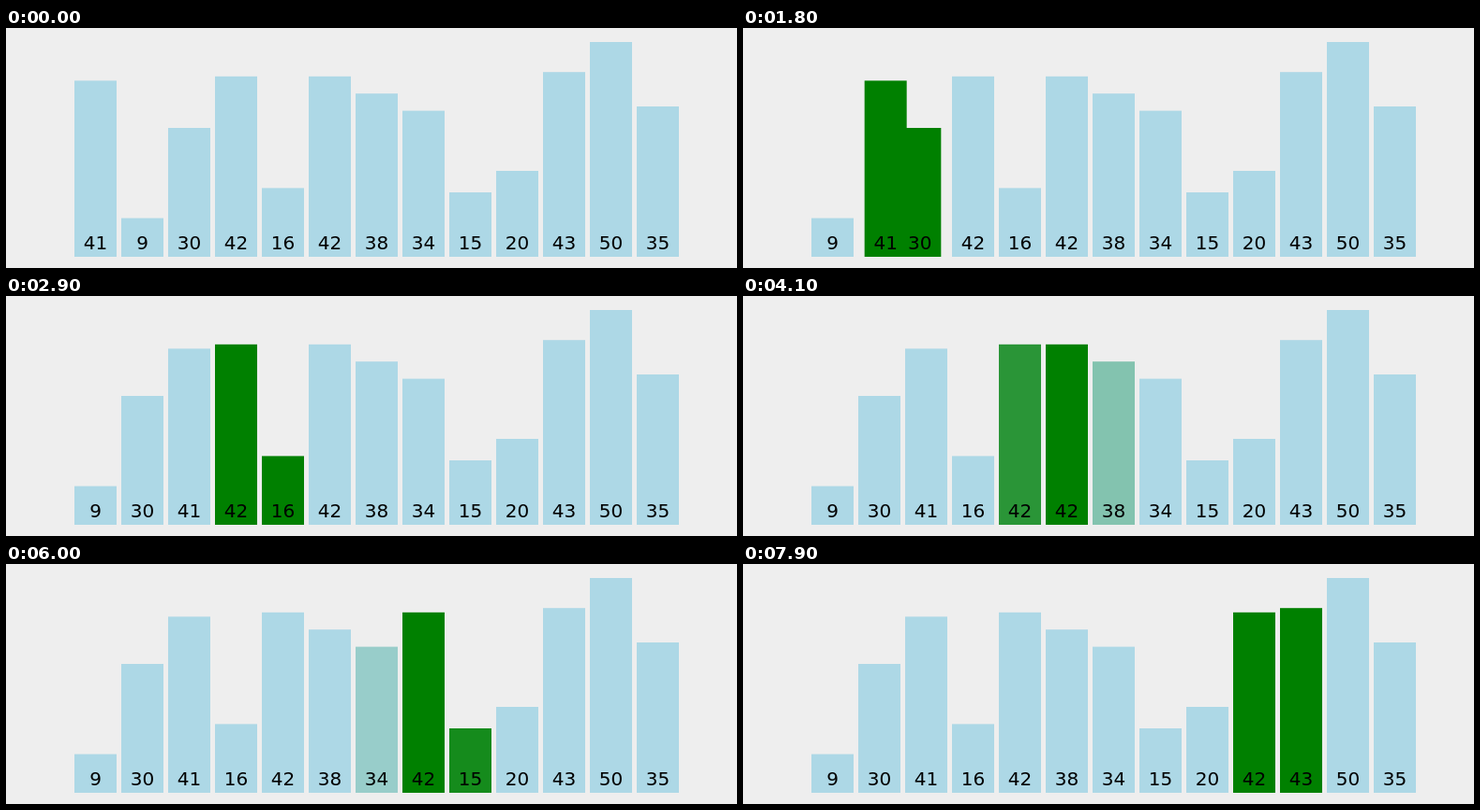
These frames come from a looping animation (780 by 257 pixels, 8000 ms). An HTML page with a canvas:

```html
<!DOCTYPE html>
<html lang="en">
<head>
<meta charset="utf-8">
<title>Bubble sort</title>
<style>
  html, body { margin: 0; width: 100%; height: 100%; overflow: hidden; background: #eee; }
  canvas { display: block; }
</style>
</head>
<body>
<canvas id="stage" width="780" height="257"></canvas>
<script>
const ctx = document.getElementById('stage').getContext('2d');
const values = [41, 9, 30, 42, 16, 42, 38, 34, 15, 20, 43, 50, 35];
const LOOP = 8000, TICK = 100;
const FIRST = 350, GAP = 456.5, LENGTH = 250;
const LEFT = 73, PITCH = 50, WIDTH = 45, BASE = 245, UNIT = 4.6;
const IDLE = [173, 216, 230], ACTIVE = [0, 128, 0];

const clamp = u => Math.max(0, Math.min(1, u));
const ease = u => u < 0.5 ? 4 * u ** 3 : 1 - 4 * (1 - u) ** 3;
const mix = (a, b, p) => a + (b - a) * p;

// One bubble pass as evenly spaced stages: mark a pair, then swap it if needed.
function planPass() {
  const order = values.map((_, i) => i);
  const stages = [];
  for (let j = 0; j < order.length - 1; j++) {
    const [a, b] = [order[j], order[j + 1]];
    stages.push({ type: 'mark', a, b });
    if (values[a] > values[b]) {
      stages.push({ type: 'swap', a, b, slot: j });
      order[j] = b;
      order[j + 1] = a;
    }
  }
  return stages;
}
const stages = planPass();

function barsAt(time) {
  const bars = values.map((value, i) => ({ value, slot: i, glow: 0 }));
  stages.forEach(({ type, a, b, slot }, k) => {
    const p = ease(clamp((time - FIRST - k * GAP) / LENGTH));
    if (p === 0) return;
    if (type === 'mark') {
      bars.forEach((bar, i) => {
        bar.glow = mix(bar.glow, i === a || i === b ? 1 : 0, p);
      });
    } else {
      bars[a].slot = mix(slot, slot + 1, p);
      bars[b].slot = mix(slot + 1, slot, p);
    }
  });
  return bars;
}

function draw(time) {
  const bars = barsAt(time);
  ctx.fillStyle = '#eee';
  ctx.fillRect(0, 0, 780, 257);
  for (const { value, slot, glow } of bars) {
    const rgb = IDLE.map((c, i) => Math.round(mix(c, ACTIVE[i], glow)));
    ctx.fillStyle = `rgb(${rgb})`;
    ctx.fillRect(LEFT + slot * PITCH, BASE - value * UNIT, WIDTH, value * UNIT);
  }
  ctx.fillStyle = '#000';
  ctx.font = '20px "DejaVu Sans", sans-serif';
  ctx.textAlign = 'center';
  for (const { value, slot } of bars) {
    ctx.fillText(value, LEFT + slot * PITCH + WIDTH / 2, BASE - 8);
  }
}

const start = performance.now();
function loop() {
  const time = (performance.now() - start) % LOOP;
  draw(Math.floor(time / TICK) * TICK);
  requestAnimationFrame(loop);
}
loop();
</script>
</body>
</html>
```
